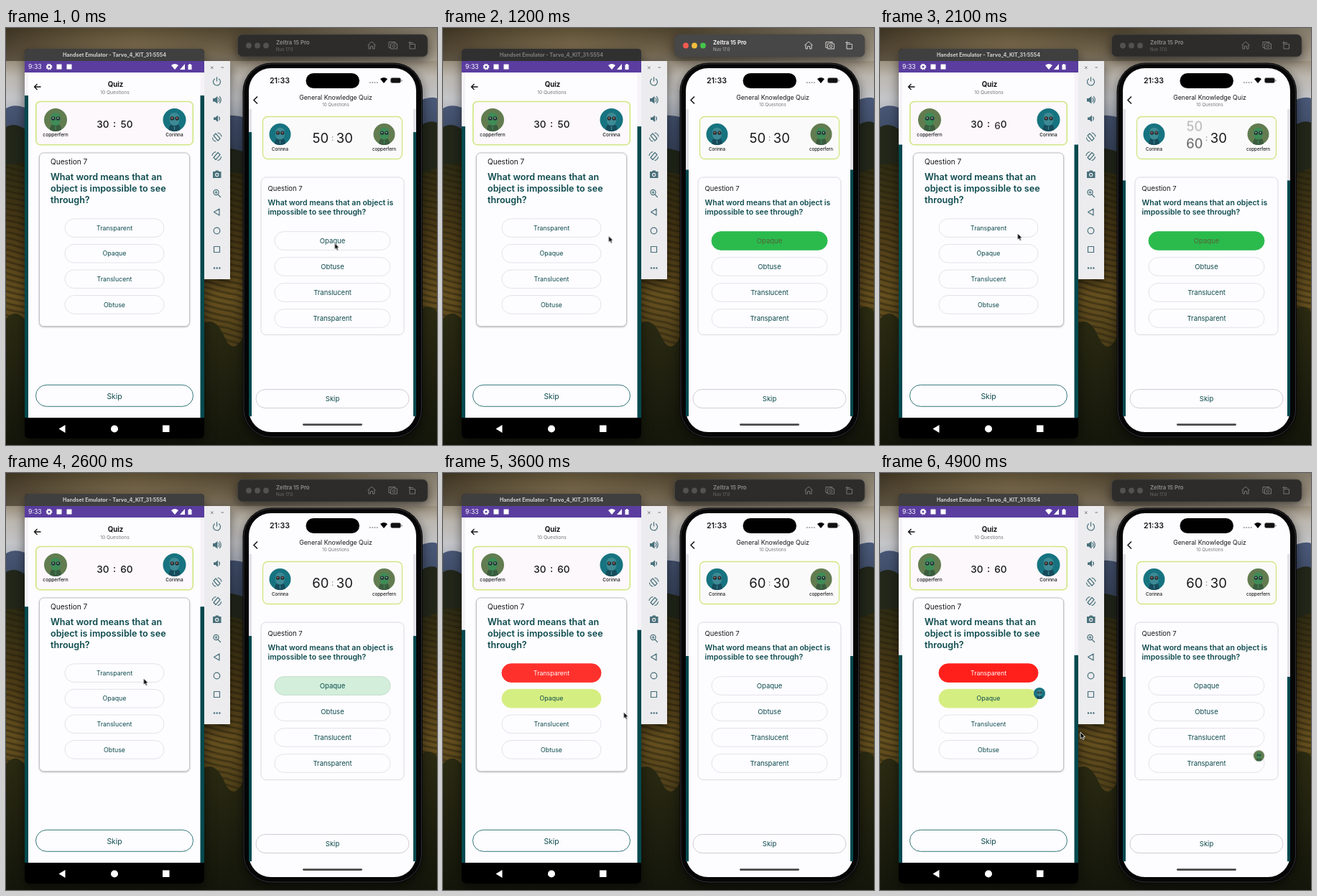
An HTML page for the animation above (5000 ms loop, 600 px wide and 581 px high).

```html
<!DOCTYPE html>
<html lang="en">
<head>
<meta charset="utf-8">
<title>Quiz on two phones</title>
<style>
html, body { margin: 0; width: 100%; height: 100%; overflow: hidden; background: #1e2010; }
#stage { display: block; width: 600px; height: 581px; font-family: Inter, "Open Sans", sans-serif; }
text { fill: #17181a; }
.mid { text-anchor: middle; }
.b { font-weight: 700; }
.sb { font-weight: 600; }
.m { font-weight: 500; }
.teal { fill: #0d4b4e; }
.grey { fill: #77777c; }
.line { fill: none; stroke: #48707a; stroke-width: 1.2; stroke-linecap: round; stroke-linejoin: round; }
.tool { fill: #48707a; }
.opt { fill: #fdfcfe; stroke: #e1dfe6; stroke-width: .9; }
.shadow { filter: drop-shadow(0 5px 8px #0008); }

.bar-a, .bar-i, .cursor, .on, .off, .title-a, .good, .good-t, .bad, .bad-t, .hint,
.old-i, .new-i, .old-a, .new-a, .pick { animation: 5s linear infinite; }

/* side timers */
.bar-a { animation-name: barA; animation-timing-function: cubic-bezier(.25,.3,.3,1); }
@keyframes barA {
  0% { transform: translateY(32px); }
  20% { transform: translateY(63.5px); }
  40% { transform: translateY(95.5px); }
  60% { transform: translateY(127.5px); }
  80% { transform: translateY(160px); }
  100% { transform: translateY(192px); }
}
.bar-i { animation-name: barI; }
@keyframes barI {
  0% { transform: translateY(32px); }
  5%, 20% { transform: translateY(57px); }
  24%, 40% { transform: translateY(84.5px); }
  44%, 60% { transform: translateY(114px); }
  64%, 80% { transform: translateY(142px); }
  84%, 100% { transform: translateY(171px); }
}

.cursor { animation-name: move; animation-timing-function: ease-in-out; }
@keyframes move {
  0%, 15% { transform: translate(457.5px,299.5px); }
  24%, 30% { transform: translate(230.5px,289.5px); }
  38%, 59% { transform: translate(191.5px,286px); }
  71%, 75% { transform: translate(251.5px,333px); }
  88%, 100% { transform: translate(279px,361px); }
}

/* window focus */
.on { animation-name: on; animation-timing-function: step-end; }
.off { animation-name: off; animation-timing-function: step-end; }
@keyframes on { 0%, 38% { opacity: 0; } 6% { opacity: 1; } }
@keyframes off { 0%, 38% { opacity: 1; } 6% { opacity: 0; } }
.title-a { animation-name: titleA; animation-timing-function: step-end; }
@keyframes titleA { 0%, 38% { fill: #cfcfcf; } 6% { fill: #7d7d7d; } }

/* answers */
.good { animation-name: good; }
@keyframes good {
  0%, 8% { fill: #fdfcfe; stroke: #e1dfe6; }
  15%, 44% { fill: #2bbb4d; stroke: #2bbb4d; }
  54%, 100% { fill: #fdfcfe; stroke: #e1dfe6; }
}
.good-t { animation-name: goodT; }
@keyframes goodT {
  0%, 8% { fill: #0d4b4e; }
  15%, 44% { fill: #546238; }
  51%, 100% { fill: #0d4b4e; }
}
.bad { animation-name: bad; }
@keyframes bad { 0%, 60% { fill: #fdfcfe; stroke: #e1dfe6; } 73%, 100% { fill: #ff201c; stroke: #ff201c; } }
.bad-t { animation-name: badT; }
@keyframes badT { 0%, 60% { fill: #0d4b4e; } 70%, 100% { fill: #fff; } }
.hint { animation-name: hint; }
@keyframes hint { 0%, 60% { fill: #fdfcfe; stroke: #e1dfe6; } 72%, 100% { fill: #d5ee81; stroke: #d5ee81; } }
.pick { animation-name: pick; }
@keyframes pick { 0%, 78% { opacity: 0; } 81%, 100% { opacity: 1; } }

/* score roll */
.old-i { animation-name: oldI; animation-timing-function: ease-out; }
.new-i { animation-name: newI; animation-timing-function: ease-out; }
.old-a { animation-name: oldA; animation-timing-function: ease-out; }
.new-a { animation-name: newA; animation-timing-function: ease-out; }
@keyframes oldI {
  0%, 37% { transform: none; opacity: 1; }
  47%, 100% { transform: translateY(-24px); opacity: 0; }
}
@keyframes newI {
  0%, 37% { transform: translateY(24px); opacity: 0; }
  47%, 100% { transform: none; opacity: 1; }
}
@keyframes oldA {
  0%, 37% { transform: none; opacity: 1; }
  42%, 100% { transform: translateY(-14px); opacity: 0; }
}
@keyframes newA {
  0%, 37% { transform: translateY(16px); opacity: 0; }
  44%, 100% { transform: none; opacity: 1; }
}
</style>
</head>
<body>
<svg id="stage" viewBox="0 0 600 581" xmlns="http://www.w3.org/2000/svg">
  <defs>
    <linearGradient id="sky" x2="0" y2="1">
      <stop offset="0" stop-color="#54482f"/><stop offset=".2" stop-color="#85755a"/>
      <stop offset=".45" stop-color="#bcb7b0"/><stop offset=".65" stop-color="#c4c5c8"/>
      <stop offset="1" stop-color="#8f9aad"/>
    </linearGradient>
    <linearGradient id="dusk">
      <stop offset="0" stop-color="#2c2519" stop-opacity=".6"/><stop offset=".3" stop-color="#6b5c3c" stop-opacity=".3"/>
      <stop offset=".55" stop-color="#3f372a" stop-opacity=".4"/><stop offset="1" stop-color="#b5b0a8" stop-opacity=".5"/>
    </linearGradient>
    <linearGradient id="hill" x2="0" y2="1">
      <stop offset="0" stop-color="#4b5a7a"/><stop offset="1" stop-color="#262f40"/>
    </linearGradient>
    <linearGradient id="field" x2="0" y2="1">
      <stop offset="0" stop-color="#2c2b13"/><stop offset=".25" stop-color="#4b3a16"/>
      <stop offset=".48" stop-color="#66501f"/><stop offset="1" stop-color="#1d1d0c"/>
    </linearGradient>
    <linearGradient id="wood" x2="0" y2="1">
      <stop offset="0" stop-color="#2c2c13"/><stop offset="1" stop-color="#14160b"/>
    </linearGradient>
    <pattern id="rows" width="40" height="8" patternUnits="userSpaceOnUse" patternTransform="rotate(14)">
      <path d="M0 3Q20 5 40 3" fill="none" stroke="#1f1a0a" stroke-width="3" opacity=".45"/>
    </pattern>
    <g id="face">
      <circle r="16" fill="var(--bg)"/>
      <path d="M-8 14Q-8 5 0 5T8 14Q0 18 -8 14Z" fill="var(--dark)"/>
      <path d="M-7 -2Q-7 -10 0 -10T7 -2Q7 8 0 8T-7 -2Z" fill="var(--skin)"/>
      <circle cx="-3.200" cy="-2" r="2.800" fill="#23333a"/><circle cx="3.600" cy="-2" r="2.800" fill="#23333a"/>
      <circle cx="-3.400" cy="-2.500" r="1" fill="var(--eye)"/><circle cx="3.400" cy="-2.500" r="1" fill="var(--eye)"/>
      <path d="M-3 4Q0 5.500 3 4M0 9V14" fill="none" stroke="var(--skin)" stroke-width="1.300"/>
    </g>
    <path id="wifi" d="M0 4L-5 -2Q0 -6 5 -2Z"/>
  </defs>

  <!-- wallpaper -->
  <rect width="600" height="150" fill="url(#sky)"/>
  <rect width="600" height="46" fill="url(#dusk)"/>
  <path d="M0 112Q15 102 40 118L270 130Q310 116 335 126L570 104Q590 94 600 98V240H0Z" fill="url(#hill)"/>
  <path d="M0 138Q14 130 30 144L270 172Q300 160 335 174L570 140Q590 126 600 132V330H0Z" fill="#22271a"/>
  <path d="M0 190Q180 172 335 205T600 195V581H0Z" fill="url(#field)"/>
  <path d="M0 190Q180 172 335 205T600 195V581H0Z" fill="url(#rows)"/>
  <path d="M0 405Q18 385 34 420L270 415Q290 398 304 430T335 420L570 398Q588 380 600 395V581H0Z" fill="url(#wood)"/>

  <!-- left phone window -->
  <g class="shadow">
    <path d="M26 35Q26 29 32 29H270Q276 29 276 35V565Q276 572 269 572H33Q26 572 26 565Z" fill="#000"/>
    <rect x="276" y="46" width="36" height="304" fill="#ececee"/>
  </g>
  <path id="cap" d="M26 46V35Q26 29 32 29H270Q276 29 276 35V46Z" fill="#3f3f3f"/>
  <path class="on" d="M26 46V35Q26 29 32 29H270Q276 29 276 35V46Z" fill="#303030"/>
  <text class="mid b title-a" x="151" y="40.300" font-size="7.200">Handset Emulator - Tarvo_4_KIT_31:5554</text>
  <rect x="26" y="46" width="250" height="16" fill="#5a3d9f"/>
  <g fill="#fff">
    <text x="31" y="57.300" font-size="8.700" style="fill:#fff">9:33</text>
    <circle cx="60" cy="54" r="2.500" fill="none" stroke="#fff" stroke-width="2"/>
    <circle cx="60" cy="54" r="3.800" fill="none" stroke="#fff" stroke-width="1.200" stroke-dasharray="1.500 1.500"/>
    <rect x="70.500" y="50.500" width="7" height="7"/>
    <rect x="84.500" y="50.500" width="7" height="7"/>
    <use href="#wifi" x="235" y="54"/>
    <path d="M242 58L249 50V58Z"/>
    <path d="M253.500 51H255V50H257V51H258.500V58H253.500Z"/>
  </g>
  <svg x="26" y="62" width="250" height="481">
    <rect width="250" height="481" fill="#f5f3f7"/>
    <rect class="bar-a" width="250" height="481" fill="#04494e"/>
  </svg>
  <rect x="31" y="62" width="239.500" height="481" fill="#fdfcfe"/>
  <path d="M48.500 82H39.500M43.500 78L39.500 82L43.500 86" fill="none" stroke="#111" stroke-width="1.300"/>
  <text class="mid b" x="152.500" y="81.500" font-size="9.700">Quiz</text>
  <text class="mid grey" x="151.500" y="91.800" font-size="6.700">10 Questions</text>
  <rect x="41.800" y="102.500" width="218.500" height="60.300" rx="6" fill="#fcf8fb" stroke="#d0e783" stroke-width="1.600"/>
  <g id="players-a"></g>
  <g font-size="13.600" class="m">
    <text class="mid" x="134.800" y="138.500">30</text>
    <text class="mid" x="151" y="138">:</text>
    <text class="old-a" x="167.700" y="138.500" text-anchor="end">5</text>
    <text class="new-a" x="167.700" y="138.500" text-anchor="end">6</text>
    <text x="167.700" y="138.500">0</text>
  </g>
  <rect x="46.500" y="174" width="209" height="241.500" rx="6" fill="#fdfcfe" stroke="#c2c1c6" style="filter:drop-shadow(0 1px 1px #0004)"/>
  <text x="62" y="189.800" font-size="10.100">Question 7</text>
  <g class="sb" font-size="12.600">
    <text class="teal" x="62" y="212">What word means that an</text>
    <text class="teal" x="62" y="228">object is impossible to see</text>
    <text class="teal" x="62" y="244">through?</text>
  </g>
  <g id="answers-a"></g>
  <rect x="41.500" y="497.300" width="219" height="30" rx="15" fill="#fdfcfe" stroke="#33777a"/>
  <text class="mid teal" x="151" y="516.500" font-size="10.400">Skip</text>
  <g fill="#fff"><path d="M73.500 558.500L82.500 553V564Z"/><circle cx="151" cy="558.500" r="5"/><rect x="218" y="553.500" width="9.500" height="9.500"/></g>

  <!-- tool strip -->
  <path d="M285 53.500L288.500 57M288.500 53.500L285 57M299.500 55H303" stroke="#777" fill="none"/>
  <g class="line">
    <path d="M290.500 71A5 5 0 1 0 296.500 71M293.500 68.500V74"/>
    <path d="M296 97.500Q298 100 296 102.500M297.500 95.500Q301 100 297.500 104.500"/>
    <path d="M296.500 124Q298.500 126 296.500 128.500"/>
    <path id="turn" d="M289 150L292 147L298 154L295 157ZM295 146Q299 147 300 151M292 158Q288 157 287.500 153"/>
    <use href="#turn" transform="matrix(-1 0 0 1 587 26.500)"/>
    <circle cx="292.500" cy="229" r="3.600"/><path d="M295 232L298.500 235.500M291 229H294M292.500 227.500V230.500"/>
    <path d="M289.500 256.500L297 252V261Z"/>
    <circle cx="293.500" cy="282.500" r="4.300"/>
    <rect x="289.500" y="304.500" width="8" height="8"/>
  </g>
  <g class="tool">
    <path d="M288 98H290.500L294.500 95V105.500L290.500 102.500H288ZM289 124.500H291.500L295 121.500V131L291.500 128H289Z"/>
    <path d="M288 200H291L292 198.500H295.500L296.500 200H299.500V209H288Z"/>
    <circle cx="293.700" cy="204.500" r="2.700" fill="#ececee"/><circle cx="293.700" cy="204.500" r="1.500"/>
    <circle cx="290" cy="334.500" r="1.200"/><circle cx="293.700" cy="334.500" r="1.200"/><circle cx="297.400" cy="334.500" r="1.200"/>
  </g>

  <!-- right phone window -->
  <rect class="shadow" x="322.500" y="9" width="264.500" height="31" rx="7" fill="#2d2c2b" stroke="#494847" stroke-width=".7"/>
  <g class="off">
    <g fill="#535251"><circle cx="338" cy="24.500" r="3.900"/><circle cx="350" cy="24.500" r="3.900"/><circle cx="362" cy="24.500" r="3.900"/></g>
    <text class="b" x="376" y="23" font-size="7.700" style="fill:#858483">Zeltra 15 Pro</text>
    <text x="376" y="31.500" font-size="6" style="fill:#6c6b6a">Nuv 17.0</text>
  </g>
  <g class="on">
    <rect x="322.500" y="9" width="264.500" height="31" rx="7" fill="#484747"/>
    <circle cx="338" cy="24.500" r="3.900" fill="#f35a52"/><circle cx="350" cy="24.500" r="3.900" fill="#f3bd3d"/><circle cx="362" cy="24.500" r="3.900" fill="#44c54c"/>
    <text class="b" x="376" y="23" font-size="7.700" style="fill:#f1f0ef">Zeltra 15 Pro</text>
    <text x="376" y="31.500" font-size="6" style="fill:#b5b4b3">Nuv 17.0</text>
  </g>
  <g fill="none" stroke="#757473">
    <g id="icons">
      <path d="M503.500 24L509 19L514.500 24M505 23V29H507.500V25.500H510.500V29H513V23"/>
      <path d="M535 27.500H533V19.500H542V21M535.500 22H537.500L538.500 21H541L542 22H544.500V29H535.500Z"/><circle cx="540" cy="25.300" r="1.800"/>
      <path d="M562 22.500H569.500V29H562ZM561 20.500H567M563 18.500L561 20.500L563 22.500"/>
    </g>
  </g>
  <use class="on" href="#icons" fill="none" stroke="#c6c5c4"/>
  <rect class="shadow" x="329.500" y="48.500" width="250.500" height="523" rx="40" fill="#060607"/>
  <rect x="331" y="50" width="247.500" height="520" rx="38.500" fill="none" stroke="#3e3e42" stroke-width=".8"/>
  <rect x="338" y="56" width="233" height="507" rx="31" fill="#fdfcfe"/>
  <svg x="338" y="113" width="233" height="428">
    <rect width="233" height="428" fill="#e2e1e7"/>
    <rect class="bar-i" width="233" height="428" fill="#04494e"/>
  </svg>
  <rect x="342" y="113" width="225" height="428.500" fill="#fdfcfe"/>
  <rect x="417.500" y="63" width="74.500" height="21" rx="10.500"/>
  <text class="mid sb" x="381" y="77.300" font-size="10.700">21:33</text>
  <path d="M506 76H518" stroke="#aaa" stroke-width="1.800" stroke-dasharray="1.800 1.500"/>
  <use href="#wifi" x="526" y="73"/>
  <rect x="535.500" y="69.500" width="14" height="7" rx="2.200" fill="#111" stroke="#777" stroke-width=".6"/>
  <path d="M551 72V74.500" stroke="#777"/>
  <path d="M350 95.500L345 100.500L350 105.500" fill="none" stroke="#111" stroke-width="1.500"/>
  <text class="mid" x="459" y="100" font-size="8.700">General Knowledge Quiz</text>
  <text class="mid grey" x="459" y="109" font-size="6.200">10 Questions</text>
  <rect x="357.500" y="123.500" width="194" height="59" rx="7" fill="#fbfafb" stroke="#d0e783" stroke-width="1.300"/>
  <g id="players-i"></g>
  <g font-size="18.500">
    <text class="mid old-i" x="437.800" y="159.500">50</text>
    <text class="mid new-i" x="437.800" y="159.500">60</text>
    <text class="mid" x="471.300" y="159.500">30</text>
    <text class="mid grey" x="454.500" y="156.500" font-size="11">:</text>
  </g>
  <rect x="355" y="208" width="199" height="219.500" rx="7" fill="#fdfcfe" stroke="#dbd9e0"/>
  <text x="364.500" y="227" font-size="9.500">Question 7</text>
  <g class="sb" font-size="10.500">
    <text class="teal" x="364.500" y="246.500">What word means that an object is</text>
    <text class="teal" x="364.500" y="260">impossible to see through?</text>
  </g>
  <g id="answers-i"></g>
  <rect x="348" y="503.500" width="213" height="26" rx="13" fill="#fdfcfe" stroke="#cfcdd4"/>
  <text class="mid teal" x="454.500" y="519.800" font-size="9.500">Skip</text>
  <rect x="413" y="551.200" width="83" height="2.800" rx="1.400" fill="#484848"/>

  <g class="cursor">
    <path d="M0 0V9.200L2.100 7.400L3.500 10.500L5.200 9.700L3.800 6.700H6.500Z" fill="#0a0a0a" stroke="#fff" stroke-width=".8"/>
  </g>
</svg>
<script>
const LOOKS = {
  green: '--bg:#627c50;--skin:#3f8c57;--dark:#3b5c3f;--eye:#b4d3a2',
  blue: '--bg:#16737f;--skin:#3d8a95;--dark:#174b5b;--eye:#d9775d'
};
const put = (id, html) => document.getElementById(id).innerHTML = html;

const face = (look, x, y, r, cls = '') =>
  `<g class="${cls}"><use href="#face" style="${LOOKS[look]}" transform="translate(${x} ${y}) scale(${r / 16})"/></g>`;

const player = (look, name, x, y, r, nameY, size) => face(look, x, y, r) +
  `<text class="mid m" x="${x}" y="${nameY}" font-size="${size}">${name}</text>`;

// each answer: [label, box class, label class]
const answers = (list, x, width, y, step, size) => list.map(([label, box = '', ink = ''], i) => {
  const mid = y + i * step;
  return `<rect class="opt ${box}" x="${x}" y="${mid - 12.8}" width="${width}" height="25.6" rx="12.8"/>` +
    `<text class="mid teal ${ink}" x="${x + width / 2}" y="${mid + size * .36}" font-size="${size}">${label}</text>`;
}).join('');

put('players-a', player('green', 'copperfern', 69, 128, 16, 151.3, 6.6) +
  player('blue', 'Corinna', 234.5, 128, 16, 151.3, 6.5));
put('players-i', player('blue', 'Corinna', 381.5, 148, 15, 171, 6.2) +
  player('green', 'copperfern', 526.5, 148, 15, 171, 6.2));

put('answers-a', answers([['Transparent', 'bad', 'bad-t'], ['Opaque', 'hint'], ['Translucent'], ['Obtuse']],
  82, 138, 278.6, 35.6, 8.8) + face('blue', 222, 307, 8, 'pick'));
put('answers-i', answers([['Opaque', 'good', 'good-t'], ['Obtuse'], ['Translucent'], ['Transparent']],
  374, 161, 296.5, 36, 9.5) + face('green', 527.5, 394, 7.6, 'pick'));
</script>
</body>
</html>
```
